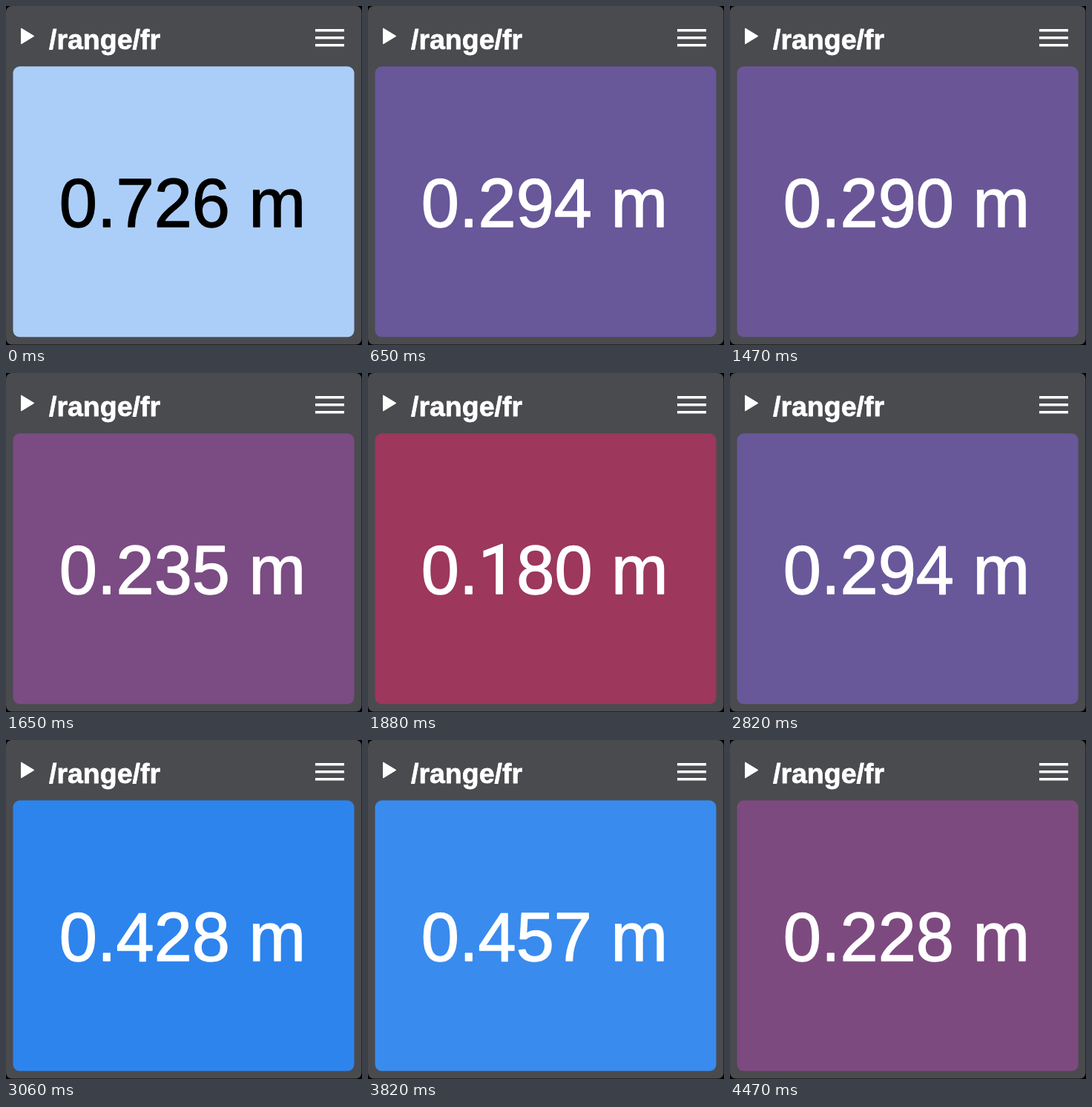
Write an HTML page with a canvas that moves like this. It is 480 px wide and 456 px high and loops after 5530 ms.

```html
<!DOCTYPE html>
<html lang="en">
<head>
<meta charset="utf-8">
<title>Range gauge</title>
<style>
  html, body { margin: 0; width: 100%; height: 100%; overflow: hidden; background: #000; }
  canvas { display: block; }
</style>
</head>
<body>
<canvas id="stage" width="480" height="456"></canvas>
<script>
const ctx = document.getElementById('stage').getContext('2d');
const LOOP = 5530;
const FPS = 17;
const FRAMES_PER_TICK = 3.4; // the sensor reports five times a second
const SANS = '"Liberation Sans", Arial, sans-serif';
const ROBOTO = 'Roboto, sans-serif';

// Hand movement: [sensor tick, [metres]]
const path = [
  [-1, [0.726]], [1, [0.296]], [7, [0.290]], [9, [0.180]], [12, [0.161]],
  [13, [0.161]], [15, [0.428]], [19, [0.457]], [21, [0.457]], [22, [0.228]]
];

// Panel gradient: [metres, rgb]
const gradient = [
  [0.161, [169, 47, 78]], [0.228, [125, 74, 128]], [0.290, [106, 86, 151]],
  [0.428, [45, 132, 237]], [0.726, [171, 206, 249]]
];

// Linear interpolation through key points, held beyond the ends.
function sample(keys, at) {
  let i = 1;
  while (i < keys.length - 1 && at > keys[i][0]) i++;
  const [start, from] = keys[i - 1], [end, to] = keys[i];
  const k = Math.min(1, Math.max(0, (at - start) / (end - start)));
  return from.map((v, n) => v + (to[n] - v) * k);
}

// A reading appears with the first screen refresh, rounded to 10 ms.
function tickStart(tick) {
  const frame = Math.floor(1.39 + FRAMES_PER_TICK * tick);
  return Math.round(frame * 100 / FPS) * 10;
}

function tickAt(time) {
  let tick = -1;
  while (tickStart(tick + 1) <= time) tick++;
  return tick;
}

function box(x, y, w, h, radius, fill) {
  ctx.fillStyle = fill;
  ctx.beginPath();
  ctx.roundRect(x, y, w, h, radius);
  ctx.fill();
}

function heavyText(text, x, y, font, color, weight) {
  ctx.font = font;
  ctx.fillStyle = ctx.strokeStyle = color;
  ctx.lineWidth = weight;
  ctx.fillText(text, x, y);
  ctx.strokeText(text, x, y);
  return ctx.measureText(text).width;
}

function drawHeader() {
  heavyText('/range/fr', 58, 58, `bold 37.5px ${SANS}`, '#fff', 0.8);
  for (let i = 0; i < 3; i++) ctx.fillRect(417, 31 + i * 10, 39, 3.5);

  ctx.lineWidth = 1;
  ctx.beginPath();
  ctx.moveTo(20.5, 30);
  ctx.lineTo(37.8, 40.5);
  ctx.lineTo(20.5, 51);
  ctx.closePath();
  ctx.fill();
  ctx.stroke();
}

// Roboto supplies a numeral one without a foot.
function drawReading(text, color) {
  let x = 71.8;
  for (const char of text) {
    const family = char === '1' ? ROBOTO : SANS;
    x += heavyText(char, x, 297, `92px ${family}`, color, 1.4);
  }
}

function draw(time) {
  const [distance] = sample(path, tickAt(time));
  const color = sample(gradient, distance).map(Math.round);
  const isLight = color[0] + color[1] + color[2] > 520;

  ctx.fillStyle = '#000';
  ctx.fillRect(0, 0, 480, 456);
  box(0, 0, 479.5, 455.5, 8, '#4a4b4e');
  drawHeader();
  box(9.5, 81.3, 460, 364, 9, `rgb(${color})`);
  drawReading(`${distance.toFixed(3)} m`, isLight ? '#000' : '#fff');
}

ctx.lineJoin = 'round';
const begin = performance.now();
function animate() {
  draw((performance.now() - begin) % LOOP);
  requestAnimationFrame(animate);
}
animate();
</script>
</body>
</html>
```
